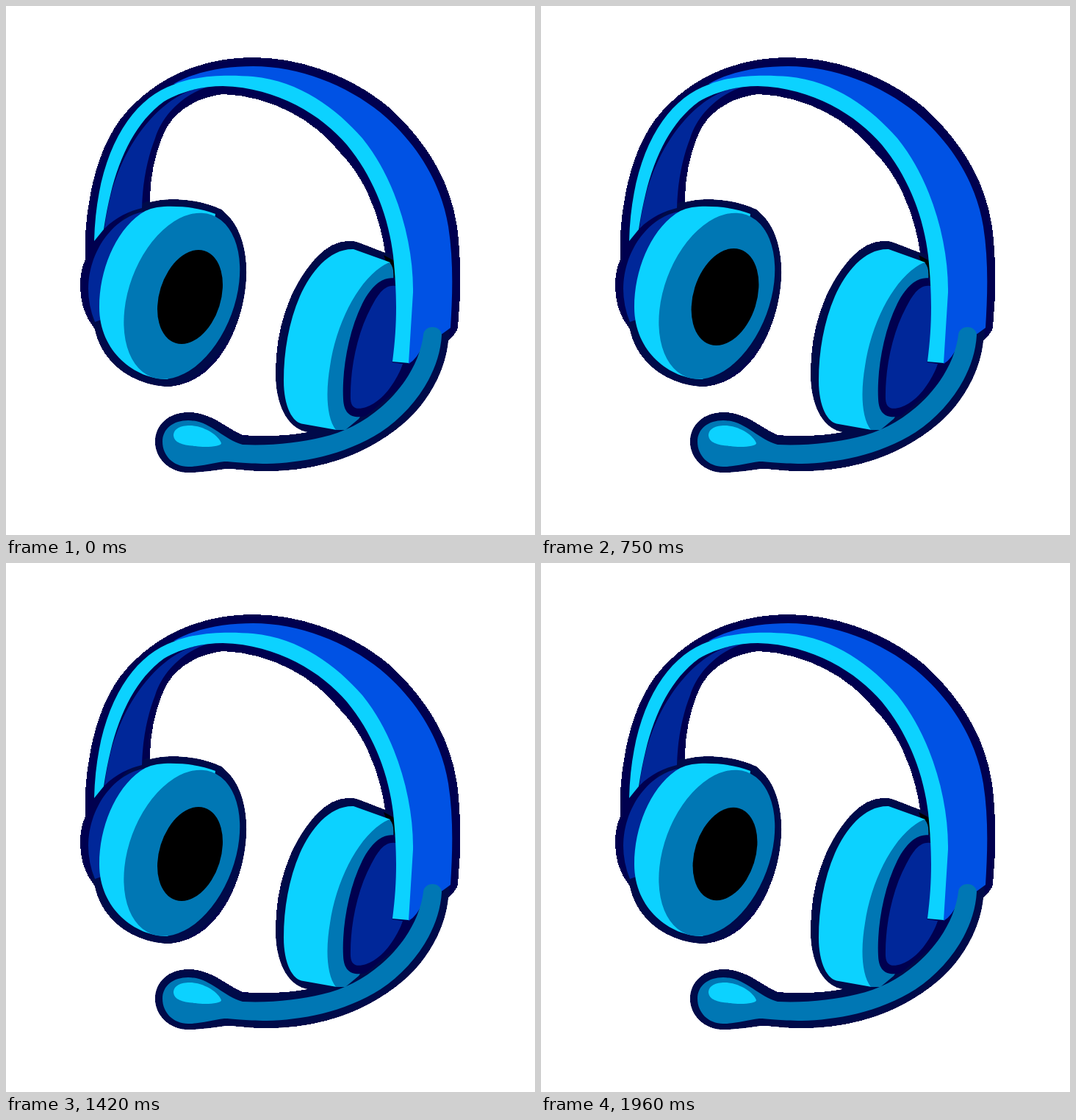
Recreate the animation shown at these times as an HTML page. Size 720 by 720 pixels, loop 2 s.

```html
<!DOCTYPE html>
<html lang="en">
<head>
<meta charset="utf-8">
<title>Headset</title>
<style>
  html, body { margin: 0; width: 100%; height: 100%; overflow: hidden; background: #fff; }
  svg { display: block; width: 100vw; height: 100vh; }
  .navy { fill: #00004f; }
  .dark { fill: #002799; }
  .blue { fill: #0052e4; }
  .cyan { fill: #0cd2ff; }
  .teal { fill: #0077b4; }
  .rim { fill: none; stroke: #000a49; stroke-width: 22; }
</style>
</head>
<body>
<svg viewBox="0 0 720 720">
  <defs>
    <path id="shape" d="M108 345V310C112 250 128 183 165 143C215 88 280 70 336 70C400 70 470 95 520 137C570 182 604 235 614 300C619 340 620 385 615 437Q614 445 602 455C598 500 570 548 530 577C480 615 420 633 355 633C325 633 310 629 298 630C282 632 265 635 248 635C224 635 203 617 203 593C203 570 222 553 248 553C280 553 300 575 322 584C355 587 390 584 412 580C385 577 367 545 367 500C367 440 385 385 420 345C440 322 462 316 480 322L516 336C510 290 490 235 455 200C420 155 360 122 295 120C250 126 222 150 212 180C200 210 196 240 196 267C225 259 265 264 293 277C320 297 328 335 327 367C325 430 290 515 220 518C170 515 130 485 121 440C105 420 101 400 101 380Q101 360 108 345Z"/>
    <clipPath id="inside"><use href="#shape"/></clipPath>
    <path id="leftCup" d="M183 283Q195 274 215 273C240 272 265 275 285 283L260 450L220 508C175 508 127 470 127 410C127 360 148 308 183 283Z"/>
    <ellipse id="face" rx="72" ry="117.6" transform="translate(239.3 394.7) rotate(20.4)"/>
    <path id="rightCup" d="M473 331C440 330 415 362 400 395C385 430 378 470 378 510C378 545 390 568 405 569L450 577L470 430L523 349Z"/>
    <path id="mic" d="M593 448C590 500 555 550 510 580C460 612 400 622 355 623C325 623 308 620 297 620C280 622 265 627 248 627C228 627 213 612 213 593C213 575 228 564 248 564C278 564 295 590 322 597C360 599 400 594 430 587C500 572 560 510 568 448A12.5 11 0 0 1 593 448Z"/>
  </defs>

  <!-- outline -->
  <use href="#shape" class="navy" shape-rendering="crispEdges"/>
  <g class="rim" clip-path="url(#inside)">
    <use href="#leftCup"/>
    <use href="#face"/>
    <use href="#rightCup"/>
    <use href="#mic"/>
  </g>

  <!-- headband, far side -->
  <path class="dark" d="M272 111C225 112 148 180 134 303C150 287 168 279 185 275C186 235 194 203 203 180C213 148 240 122 272 111Z"/>

  <!-- left cup -->
  <path class="dark" d="M187 280C145 288 112 335 112 385Q112 408 121 430L150 420Z"/>
  <use href="#leftCup" class="cyan"/>
  <use href="#face" class="teal"/>
  <g transform="translate(250.5 396) rotate(17.4)">
    <ellipse id="pad" rx="41.8" ry="65.8"/>
  </g>

  <!-- right cup -->
  <path d="M514 339L529 347L531 374L518 350Z"/>
  <use href="#rightCup" class="cyan"/>
  <path class="teal" d="M522 349C484 364 450 428 441 490C435 525 436 560 449 577H462L480 562L495 540V400L527 372Q529 356 522 349Z"/>
  <path class="navy" d="M534 372C512 364 495 385 485 405C465 445 457 500 459 535C460 557 472 562 490 558L560 500Z"/>
  <path class="dark" d="M534 382C515 376 505 395 497 410C478 445 468 495 469 535C470 550 480 549 490 546C513 538 530 513 541 486Z"/>
  <path class="navy" d="M525 485L567 462L553 500L533 508L540 487Z"/>

  <!-- headband, near side -->
  <path class="blue" d="M228 106C260 88 300 82 336 82C400 82 465 108 512 147C560 188 592 240 602 300C609 345 608 390 605 438L594 446L567 462Q560 480 548 487L543 400C540 320 520 245 474 185C435 140 370 103 300 100Z"/>
  <path class="cyan" d="M228 107C265 92 310 94 336 96C400 102 450 140 485 180C530 235 555 320 554 390L548 486L526 484C533 430 532 390 527 340C521 290 502 235 464 189C430 149 370 111 295 109C270 109 240 115 215 130C167 165 144 230 133 304L120 320C123 200 170 127 228 107Z"/>

  <!-- microphone -->
  <use href="#mic" class="teal"/>
  <path class="cyan" d="M228 585C228 575 238 571 250 571C270 571 290 585 293 595C293 600 270 601 258 599C240 598 229 594 228 585Z"/>
</svg>
<script>
  const LOOP = 2000, FPS = 24;
  const SWELL = 0.215, DIP = 0.015, TAIL = 0.4;
  const pad = document.getElementById("pad");

  // three beats, timed in frames
  const beats = [
    { start: 8, length: 10.5 },
    { start: 20, length: 9.5 },
    { start: 38, length: 8 }
  ];

  // a half-sine swell followed by a slight dip
  function pulse(u) {
    if (u < 0 || u > 1 + TAIL) return 0;
    return u < 1 ? SWELL * Math.sin(Math.PI * u) : -DIP * Math.sin(Math.PI * (u - 1) / TAIL);
  }

  const scaleAt = frame =>
    beats.reduce((s, b) => s + pulse((frame - b.start) / b.length), 1);

  function draw(now) {
    const frame = Math.floor((now % LOOP + 4) * FPS / 1000) % (LOOP * FPS / 1000);
    pad.setAttribute("transform", `scale(${scaleAt(frame).toFixed(4)})`);
    requestAnimationFrame(draw);
  }
  draw(performance.now());
</script>
</body>
</html>
```
